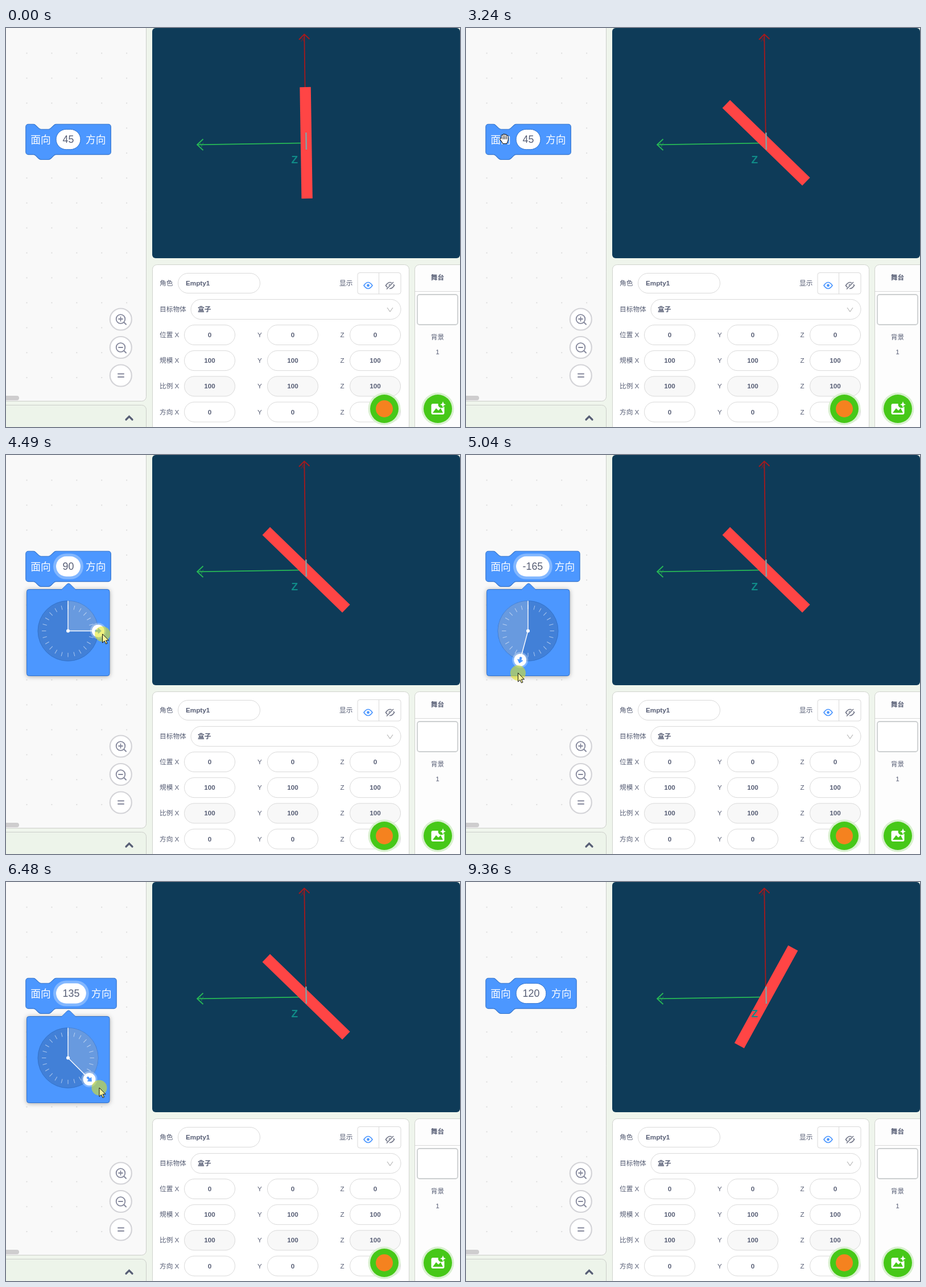
Recreate the animation shown at these times as an HTML page with a canvas. Size 798 by 702 pixels, loop 9.89 s.

```html
<!DOCTYPE html>
<html lang="zh">
<head>
<meta charset="utf-8">
<style>
  html, body { margin: 0; width: 100%; height: 100%; overflow: hidden; background: #eff5ec; }
  canvas { display: block; }
</style>
</head>
<body>
<canvas id="stage" width="798" height="702"></canvas>
<script>
const ctx = document.getElementById('stage').getContext('2d');
const LOOP = 9890, RAD = Math.PI / 180;
const FONT = '"Liberation Sans", "Noto Sans CJK SC", "Noto Sans CJK", sans-serif';
const BLUE = '#4c97ff', EDGE = '#3373cc', INK = '#575e75', LINE = '#d9d9d9';
const DIAL = { x: 109, y: 309.5, r: 53 };

// ---- timing ----
const cursorBefore = [[130, 676, 656], [330, 247, 156], [530, 247, 156], [740, 181, -4],
  [950, 216, 29], [1150, 216, 29], [1290, 110, 196], [1750, 110, 196], [1890, 67, 195],
  [3240, 67, 195], [3500, 120, 197], [4000, 120, 197], [4210, 147, 273]];
const drag = [[4210, 45, 53], [5040, 193, 76], [5250, 270, 80], [5650, 270, 80],
  [6480, 133.7, 76], [6810, 133.7, 76], [7020, 122, 67]];
const cursorAfter = [[7480, 166, 345], [7820, 169, 213], [8760, 169, 213], [9340, 800, 706]];
const cursorKinds = [[0, 'arrow'], [1280, 'beam'], [1820, 'hand'], [3400, 'beam'],
  [4140, 'arrow'], [7720, 'hand'], [8830, 'arrow']];
const presses = [[2290, 2550], [3570, 3710], [4210, 7480], [7820, 8060]];
const OPEN = 3720, CLOSE = 7960;

const between = (t, a, b) => t >= a && t < b;

function sample(keys, t) {
  const i = keys.findIndex(k => k[0] > t);
  if (i < 0) return keys[keys.length - 1].slice(1);
  if (i === 0) return keys[0].slice(1);
  const a = keys[i - 1], b = keys[i], p = (t - a[0]) / (b[0] - a[0]);
  return a.slice(1).map((v, n) => v + (b[n + 1] - v) * p);
}

function cursorAt(t) {
  if (t < 4210) return sample(cursorBefore, t);
  if (t >= 7480) return sample(cursorAfter, t);
  const [angle, r] = sample(drag, t);
  return [DIAL.x + r * Math.sin(angle * RAD), DIAL.y - r * Math.cos(angle * RAD)];
}

function valueAt(t) {
  const v = Math.round(sample(drag, t)[0] / 15) * 15;
  return v > 180 ? v - 360 : v;
}

// ---- drawing helpers ----
function paint(fill, stroke, width = 1) {
  if (fill) { ctx.fillStyle = fill; ctx.fill(); }
  if (stroke) { ctx.strokeStyle = stroke; ctx.lineWidth = width; ctx.stroke(); }
}
function box(x, y, w, h, r, fill, stroke, width) {
  ctx.beginPath(); ctx.roundRect(x, y, w, h, r); paint(fill, stroke, width);
}
function circle(x, y, r, fill, stroke, width) {
  ctx.beginPath(); ctx.arc(x, y, r, 0, 7); paint(fill, stroke, width);
}
function lines(points, stroke, width) {
  ctx.beginPath();
  for (let i = 0; i < points.length; i += 2) ctx.lineTo(points[i], points[i + 1]);
  paint(null, stroke, width);
}
function shape(d, fill, stroke, width) {
  const path = new Path2D(d);
  if (fill) { ctx.fillStyle = fill; ctx.fill(path); }
  if (stroke) { ctx.strokeStyle = stroke; ctx.lineWidth = width; ctx.stroke(path); }
}
function text(s, x, y, { size = 11.7, weight = 400, color = INK, align = 'left' } = {}) {
  ctx.font = `${weight} ${size}px ${FONT}`;
  ctx.fillStyle = color;
  ctx.textAlign = align;
  ctx.fillText(s, x, y);
}
function at(x, y, draw, scale = 1, angle = 0) {
  ctx.save();
  ctx.translate(x, y); ctx.rotate(angle); ctx.scale(scale, scale);
  draw();
  ctx.restore();
}

// ---- fixed interface ----
function workspace() {
  box(-9.5, -9.5, 256, 666, 8, '#f9f9f9', '#cbcdc9');
  for (let x = 36; x < 240; x += 43.9)
    for (let y = 43.9; y < 640; y += 43.9) {
      ctx.fillStyle = '#dedede';
      ctx.fillRect(x - 0.5, y - 0.5, 2, 2);
    }
  box(-9, 647, 32, 8, 4, '#cecdce');
  for (const y of [512.5, 562, 611.5]) circle(201.8, y, 19, '#fff', '#d3d3d7', 2.2);
  const grey = '#85889c';
  ctx.lineCap = 'round';
  for (const y of [512, 562]) {
    circle(201.5, y, 7.8, null, grey, 1.8);
    lines([207.5, y + 6, 211, y + 9.5], grey, 2);
    lines([198, y, 205, y], grey, 1.8);
  }
  lines([201.5, 508.5, 201.5, 515.5], grey, 1.8);
  for (const y of [608.5, 614]) lines([197, y, 207, y], grey, 2);
  box(-9.5, 663.5, 256, 60, 8, '#edf4ea', '#cbcdc9');
  lines([211, 689, 216.5, 683.5, 222, 689], INK, 3.2);
  ctx.lineCap = 'butt';
}

function field(x, y, w, label, fill = '#fff') {
  box(x + 0.5, y - 17.5, w - 1, 35, 17.5, fill, LINE);
  if (label) text(label, x + w / 2, y + 4, { weight: 700, align: 'center' });
}

function eye(x, y, color, crossed) {
  at(x, y, () => {
    shape('M-7.5 0Q0-11 7.5 0Q0 11-7.5 0Z', null, color, 1.7);
    circle(0, 0, 2.4, color);
    if (crossed) {
      lines([-5, 6.5, 6.5, -5.5], '#fff', 4);
      lines([-6, 6.5, 6, -6], color, 1.6);
    }
  });
}

function properties() {
  box(257.5, 416.5, 451, 320, 8, '#fff', '#d0d3ce');
  text('角色', 270, 453);
  field(302, 449, 145);
  text('Empty1', 316, 453, { weight: 700 });
  text('显示', 586, 453);
  box(618, 430.5, 76, 37.5, 4, '#fff', LINE);
  lines([655.5, 431, 655.5, 468], LINE, 1);
  eye(636.5, 453, BLUE);
  eye(675, 453, '#74788a', true);
  text('目标物体', 270, 499);
  field(324.5, 495, 370);
  text('盒子', 337, 499, { weight: 700 });
  lines([670, 492, 675, 499, 680, 492], '#b5b5b5', 1.1);
  [['位置', 0], ['规模', 100], ['比例', 100], ['方向', 0]].forEach(([name, value], row) => {
    const y = 540 + row * 45.2, fill = row === 2 ? '#f8f8f8' : '#fff';
    text((row === 1 ? '規模' : name) + ' X', 270, y + 4);
    text('Y', 442, y + 4);
    text('Z', 587.5, y + 4);
    for (const x of [313, 459, 604]) field(x, y, 90, String(value), fill);
  });
}

function roundButton(x) {
  circle(x, 670, 28.5, '#d9f0d0');
  circle(x, 670, 25, '#46c818');
}

function sidePanel() {
  box(718.5, 416.5, 100, 320, 8, '#fdfdfd', '#d0d3ce');
  lines([719, 463.5, 798, 463.5], LINE, 1);
  text('舞台', 758.5, 443, { weight: 700, align: 'center' });
  box(723, 469, 71, 53, 4, '#fff', '#cccfd0', 1.8);
  text('背景', 758.5, 548, { align: 'center' });
  text('1', 758.5, 573.5, { align: 'center' });
  roundButton(759);
  box(747.5, 661, 23, 19, 3, '#fff');
  shape('M750 677L756 669L760 673L764 669L768 677Z', '#46c818');
  circle(765.5, 662.5, 6, '#46c818');
  shape('M768 657L769.5 661L773 662.5L769.5 664L768 668L766.5 664L763 662.5L766.5 661Z', '#fff');
}

function scene(t) {
  box(257, 0, 541, 405, 6, '#0e3b58');
  const red = '#a8191c', green = '#27b956';
  text('X', 521.5, 24, { size: 11, color: '#76202c', align: 'center' });
  lines([527, 203, 524.3, 11], red, 1.8);
  lines([515, 20.5, 524.3, 11, 533.5, 19.5], red, 1.8);
  text('Y', 344, 210, { size: 11, color: '#218354', align: 'center' });
  lines([527, 202.3, 336, 205.3], green, 1.8);
  lines([346.5, 195.5, 336, 205.3, 346.5, 215], green, 1.8);
  const tilt = t < 2420 ? 89.1 : t < 8030 ? 44.2 : 118.8;
  at(527.6, 202, () => {
    ctx.fillStyle = '#ff4545';
    ctx.fillRect(-98, -9.7, 196, 19.4);
  }, 1, tilt * RAD);
  lines([527.4, 184, 527.9, 214], '#82a3a5', 2.4);
  text('Z', 507.3, 238, { size: 19, weight: 700, color: '#108b88', align: 'center' });
}

// ---- block and angle picker ----
const NOTCH = 'c2 0 3 1 4 2l4 4c1 1 2 2 4 2h12c2 0 3-1 4-2l4-4c1-1 2-2 4-2';
const NOTCH_BACK = 'c-2 0-3 1-4 2l-4 4c-1 1-2 2-4 2h-12c-2 0-3-1-4-2l-4-4c-1-1-2-2-4-2';

function block(t, value) {
  const size = 17.8, label = String(value), editing = between(t, 3640, CLOSE);
  ctx.font = `${size}px ${FONT}`;
  const w = Math.max(43, ctx.measureText(label).width + 23.2);
  const right = (w + 106.5) / 1.11;
  at(34.8, 169.3, () => shape(
    `M0 4A4 4 0 0 1 4 0H12${NOTCH}H${right - 4}a4 4 0 0 1 4 4v40a4 4 0 0 1-4 4H48${NOTCH_BACK}H4a4 4 0 0 1-4-4Z`,
    BLUE, EDGE, 1), 1.11);
  const white = { size, weight: 500, color: '#fff' };
  text('面向', 43.3, 202.5, white);
  text('方向', 88 + w + 9, 202.5, white);
  if (editing) box(85.5, 176, w + 5, 40, 20, null, 'rgba(255,255,255,.3)', 5);
  box(88, 178.3, w, 35.4, 17.7, '#fff', editing ? null : EDGE);
  const selected = editing && t < 4280;
  if (selected) {
    ctx.fillStyle = '#1683f5';
    ctx.fillRect(98.5, 185, 21, 21);
  }
  text(label, 88 + w / 2, 202, { size, align: 'center', color: selected ? '#fff' : INK });
}

function picker(t, value) {
  if (!between(t, OPEN, CLOSE)) return;
  const p = Math.min(1, (t - OPEN) / 250), { x, y, r } = DIAL, a = value * RAD;
  at(0, -20 * (1 - p) ** 2, () => {
    ctx.save();
    ctx.shadowColor = 'rgba(0,0,0,.35)';
    ctx.shadowBlur = 8;
    ctx.shadowOffsetY = 1;
    box(36.5, 236.5, 145.5, 152, 4, BLUE);
    ctx.restore();
    box(36.5, 236.5, 145.5, 152, 4, null, EDGE);
    shape('M97 237.5L107.5 227Q110 225 112.5 227L123 237.5', BLUE, EDGE, 1);
    ctx.fillStyle = BLUE;
    ctx.fillRect(98, 236.8, 24, 2);

    circle(x, y, r, '#4280d7', EDGE);
    ctx.beginPath();
    ctx.moveTo(x, y);
    ctx.arc(x, y, r, -Math.PI / 2, a - Math.PI / 2, value < 0);
    paint('rgba(255,255,255,.2)');
    for (let i = 0; i < 24; i++)
      at(x, y, () => lines([38.5, 0, 46, 0], 'rgba(255,255,255,.55)', 1), 1, i * 15 * RAD);
    lines([x, y - r, x, y, x + r * Math.sin(a), y - r * Math.cos(a)], '#fff', 1.4);
    circle(x, y, 3, '#fff');
    at(x + r * Math.sin(a), y - r * Math.cos(a), () => {
      circle(0, 0, 14, 'rgba(255,255,255,.3)');
      circle(0, 0, 11, '#fff');
      shape('M0-5.5L4.7 0H1.6V5H-1.6V0H-4.7Z', BLUE, BLUE, 0.8);
    }, 1, a);
  });
}

// ---- pointer ----
function hand(closed, fill) {
  const top = closed ? -3.5 : -7;
  const fingers = `M-3.5 2V${top + 1.5}M-0.5 2V${top}M2.5 2V${top + 0.5}M5.3 2V${top + 2.5}M-2 5L-6 ${closed ? 1 : 0.5}`;
  const palm = 'M-4 1H6V3Q5 6 4 8H-2L-5 3Z';
  ctx.lineCap = ctx.lineJoin = 'round';
  shape(fingers, null, '#111', 4.2);
  shape(palm, '#111', '#111', 2);
  shape(fingers, null, fill, 2.2);
  shape(palm, fill);
  for (const x of [-2, 1, 4]) lines([x, top + 3, x, 0], '#111', 0.7);
  ctx.lineCap = 'butt';
  ctx.lineJoin = 'miter';
}

function pointer(t) {
  if (!between(t, 130, 9350)) return;
  const [x, y] = cursorAt(t);
  const kind = cursorKinds.filter(k => k[0] <= t).pop()[1];
  const pressed = presses.some(([a, b]) => between(t, a, b));
  const fill = pressed ? '#f6f39a' : '#fff';
  if (pressed) circle(x, y, 13.5, 'rgba(228,232,20,.55)');
  at(x, y, () => {
    if (kind === 'arrow') shape('M0 0V15.5L3.6 12.2L6 17.5L8.5 16.4L6.1 11.2H11Z', fill, '#111', 1);
    else if (kind === 'hand') hand(pressed, fill);
    else shape('M-3-8Q0-8 0-6Q0-8 3-8M0-6V6M-3 8Q0 8 0 6Q0 8 3 8', null, '#111', 1.2);
  });
}

function render(now) {
  const t = now % LOOP, value = valueAt(t);
  ctx.fillStyle = '#eff5ec';
  ctx.fillRect(0, 0, 798, 702);
  workspace();
  scene(t);
  properties();
  sidePanel();
  roundButton(665);
  circle(665, 670, 15, '#f5821f');
  block(t, value);
  picker(t, value);
  pointer(t);
}

const start = performance.now();
function tick() {
  render(performance.now() - start);
  requestAnimationFrame(tick);
}
tick();
</script>
</body>
</html>
```
